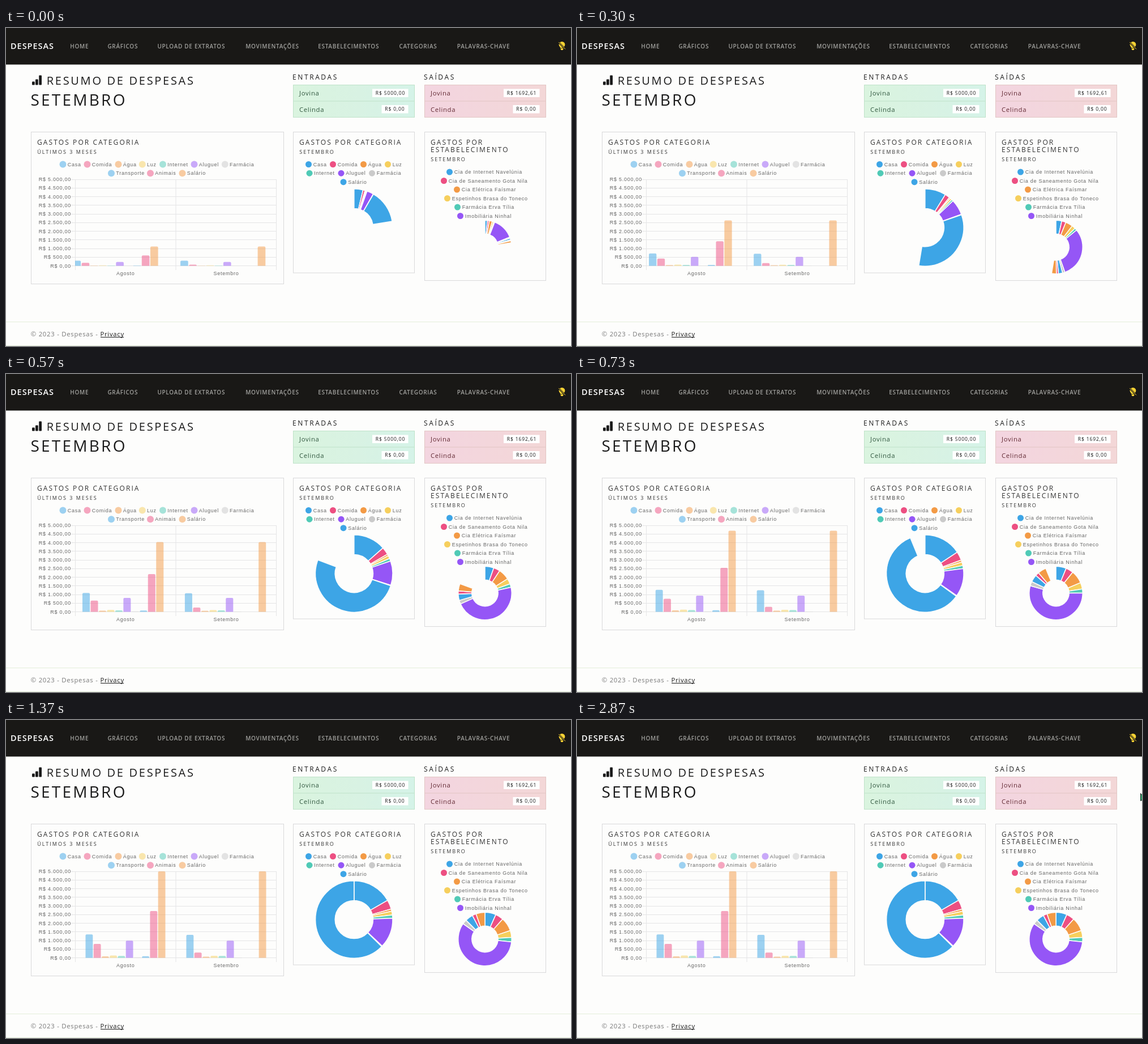
Animation, 998 px wide and 561 px high, one loop 3230 ms. Source, as an HTML page with a canvas:

```html
<!DOCTYPE html>
<html lang="pt-BR">
<head>
<meta charset="utf-8">
<title>Despesas</title>
<style>
  html, body { margin: 0; width: 100%; height: 100%; overflow: hidden; background: #fdfdfc; }
  svg, canvas { position: absolute; left: 0; top: 0; width: 998px; height: 561px; }
  text { font-family: "Open Sans", "Noto Sans", sans-serif; fill: #1a1a1a; white-space: pre; }
  .brand { font-size: 14.5px; font-weight: 600; letter-spacing: .95px; fill: #fff; }
  .nav { font-size: 10px; font-weight: 600; letter-spacing: .7px; fill: #a0a09d; }
  .title { font-size: 20px; letter-spacing: 2.7px; }
  .month { font-size: 28px; letter-spacing: 3.2px; }
  .head { font-size: 12px; letter-spacing: 2.6px; }
  .card { font-size: 12px; letter-spacing: 2.1px; fill: #333; }
  .sub { font-size: 9px; letter-spacing: 2px; fill: #333; }
  .person { font-size: 11.3px; letter-spacing: .7px; }
  .badge { font-size: 8.5px; letter-spacing: .9px; }
  .foot { font-size: 11.3px; letter-spacing: .75px; fill: #777; }
  .link { fill: #1a1a1a; }
  .chart { font-family: "Liberation Sans", Arial, sans-serif; font-size: 9px; letter-spacing: .75px; fill: #666; }
  .end { text-anchor: end; }
  .mid { text-anchor: middle; }
</style>
</head>
<body>
<svg id="page" viewBox="0 0 998 561">
  <defs>
    <linearGradient id="green"><stop offset="0" stop-color="#daf4df"/><stop offset=".55" stop-color="#d8f2e3"/><stop offset="1" stop-color="#d5f3e8"/></linearGradient>
    <linearGradient id="red"><stop offset="0" stop-color="#f3d5e0"/><stop offset="1" stop-color="#f3d7d7"/></linearGradient>
  </defs>
  <rect width="998" height="64.5" fill="#191816"/>
  <g fill="#fbd434">
    <path d="M982 24a5.4 5.4 0 0 1 5.4 5.4c0 2.300-2.200 3.600-2.600 5.600h-5.600c-.4-2-2.600-3.300-2.600-5.600A5.400 5.400 0 0 1 982 24z"/>
    <path d="M979.400 35.800h5.200l-.5 2-.9 1.200h-2.400l-.9-1.200z"/>
    <path d="M976 25l12 12.500" stroke="#191816" stroke-width="2.600"/>
    <path d="M976.300 25l11.700 12.300" stroke="#fbd434" stroke-width="1"/>
  </g>
  <g fill="#1a1a1a">
    <rect x="46" y="94.500" width="4.800" height="6" rx="1"/>
    <rect x="52" y="90.500" width="4.800" height="10" rx="1"/>
    <rect x="58.200" y="83.500" width="4.800" height="17" rx="1"/>
  </g>
  <path d="M0 518.500H998M0 560.500H998" stroke="#e4efda"/>
  <path d="M167 545.500H208" stroke="#1a1a1a"/>
</svg>
<canvas id="charts"></canvas>
<script>
const page = document.getElementById('page');
const canvas = document.getElementById('charts');
const ctx = canvas.getContext('2d');
const LOOP = 3230, TAU = Math.PI * 2;
const BG = '#fdfdfc';
const BLUE = '#3da5e6', PINK = '#ed4f82', ORANGE = '#f39a45', YELLOW = '#f6cf5d',
      TEAL = '#50cab6', PURPLE = '#9556f6', GRAY = '#cacaca';
const PALETTE = [BLUE, PINK, ORANGE, YELLOW, TEAL, PURPLE, GRAY];

function add(tag, attrs, content) {
  const el = document.createElementNS('http://www.w3.org/2000/svg', tag);
  for (const key in attrs) el.setAttribute(key, attrs[key]);
  if (content) el.textContent = content;
  page.appendChild(el);
  return el;
}
const text = (cls, x, y, str, fill) => {
  const el = add('text', { class: cls, x, y }, str);
  if (fill) el.style.fill = fill;
};
const box = (x, y, width, height, fill, stroke = 'none') => add('rect', { x, y, width, height, fill, stroke });
const path = (d, stroke) => add('path', { d, stroke, fill: 'none' });

// Page frame
text('brand', 8, 36.5, 'DESPESAS');
[[113.2, 'HOME'], [179.4, 'GRÁFICOS'], [267.4, 'UPLOAD DE EXTRATOS'], [423.2, 'MOVIMENTAÇÕES'],
 [551.2, 'ESTABELECIMENTOS'], [694.4, 'CATEGORIAS'], [796.8, 'PALAVRAS-CHAVE']]
  .forEach(([x, label]) => text('nav', x, 35.5, label));
text('title', 71.8, 99.5, 'RESUMO DE DESPESAS');
text('month', 43.5, 137, 'SETEMBRO');
text('foot', 43.8, 543.5, '© 2023 - Despesas -');
text('foot link', 166.4, 543.5, 'Privacy');

// Income and expense lists
function list(x, title, fill, stroke, ink, rows) {
  text('head', x - 1, 91.3, title);
  box(x + .5, 100.5, 214, 57, `url(#${fill})`, stroke);
  path(`M${x} 129H${x + 215}`, stroke);
  rows.forEach(([name, value, width], i) => {
    const y = 107.5 + i * 28.5;
    text('person', x + 11, y + 11.5, name, ink);
    box(x + 203.5 - width, y, width, 14.5, '#fff');
    text('badge', x + 209.500 - width - 0.2, y + 10.2, value);
  });
}
list(507, 'ENTRADAS', 'green', '#bfe2c9', '#31573f', [['Jovina', 'R$ 5000,00', 63.5], ['Celinda', 'R$ 0,00', 47]]);
list(739, 'SAÍDAS', 'red', '#e2c5c3', '#642c36', [['Jovina', 'R$ 1692,61', 63.5], ['Celinda', 'R$ 0,00', 47]]);

// Cards
function card(x, width, height, titles, sub) {
  box(x + .5, 183.5, width, height, 'none', '#d9d9db');
  titles.forEach((line, i) => text('card', x + 11, 205.5 + i * 13, line));
  text('sub', x + 11.300, 208.5 + titles.length * 13, sub);
}
card(44, 446, 268, ['GASTOS POR CATEGORIA'], 'ÚLTIMOS 3 MESES');
card(507, 214, 248.5, ['GASTOS POR CATEGORIA'], 'SETEMBRO');
card(739, 214, 262, ['GASTOS POR', 'ESTABELECIMENTO'], 'SETEMBRO');

function legend(items, r, opacity) {
  items.forEach(([cx, cy, label], i) => {
    add('circle', { cx, cy, r, fill: PALETTE[i % 7], opacity });
    text('chart', cx + 8.3, cy + 3, label);
  });
}
legend([[100.5, 240.5, 'Casa'], [143.5, 240.5, 'Comida'], [198.5, 240.5, 'Água'], [240.8, 240.5, 'Luz'],
        [277, 240.5, 'Internet'], [332.500, 240.5, 'Aluguel'], [386.8, 240.5, 'Farmácia'],
        [186, 256.3, 'Transporte'], [255, 256.3, 'Animais'], [311.5, 256.3, 'Salário']], 6, .5);
legend([[534.5, 240.5, 'Casa'], [577.5, 240.5, 'Comida'], [631.5, 240.5, 'Água'], [674.5, 240.5, 'Luz'],
        [536, 256.2, 'Internet'], [592, 256.2, 'Aluguel'], [646.5, 256.2, 'Farmácia'],
        [596, 271.7, 'Salário']], 5.5, 1);
legend([[783.5, 254, 'Cia de Internet Navelúnia'], [773.5, 269.5, 'Cia de Saneamento Gota Nila'],
        [796.5, 285, 'Cia Elétrica Faísmar'], [779.5, 300.5, 'Espetinhos Brasa do Toneco'],
        [797.5, 316, 'Farmácia Erva Tília'], [802.5, 331.5, 'Imobiliária Ninhal']], 5.5, 1);

// Bar chart axes
const area = { left: 122, right: 478, top: 267, base: 419.7 };
const MAX = 5000;
const yOf = value => area.base - value / MAX * (area.base - area.top);
for (let v = 0; v <= MAX; v += 500) {
  const amount = v ? (v >= 1000 ? `${Math.floor(v / 1000)}.${String(v % 1000).padStart(3, '0')}` : v) : 0;
  const y = Math.floor(yOf(v)) + .5;
  path(`M115 ${y}H${area.right}`, '#e5e5e6');
  text('chart end', 115, yOf(v) + 3, `R$ ${amount},00`);
}
[122.5, 300, 477.5].forEach(x => path(`M${x} 267V427`, '#e5e5e6'));
text('chart mid', 211.3, 435.5, 'Agosto');
text('chart mid', 389, 435.5, 'Setembro');

// Pointer entering at the right edge
const pointer = add('path', { d: 'M995.5 129.500L1001 136V140L995.5 142.5Z', fill: '#2fa36b', stroke: '#16241c' });

// Animated charts
const august = [1360, 810, 90, 140, 110, 1000, 35, 100, 2710, 5000];
const september = [1335, 310, 75, 125, 110, 1000, 25, 0, 0, 5000];
const byCategory = september.filter(v => v > 0);
const byShop = [24, 17.5, 30, 15, 9.5, 209, 10, 17, 8.5, 19.5];

// [time, progress, slope per ms]
const KEYS = [[0, .223, .001], [300, .525, .00102], [570, .806, .00095], [730, .937, .00065], [870, 1, 0]];
function progress(t) {
  const i = KEYS.findIndex(k => k[0] > t);
  if (i < 0) return 1;
  const [t0, p0, m0] = KEYS[i - 1], [t1, p1, m1] = KEYS[i];
  const d = t1 - t0, u = (t - t0) / d, v = 1 - u;
  return v * v * ((1 + 2 * u) * p0 + u * d * m0) + u * u * ((1 + 2 * v) * p1 - v * d * m1);
}

function bars(p) {
  ctx.save();
  ctx.beginPath();
  ctx.rect(area.left, area.top, area.right - area.left, area.base - area.top);
  ctx.clip();
  ctx.globalAlpha = .5;
  // The plot starts wider, before the axis labels take their room
  const left = area.left - 30 * (1 - p);
  const slot = (area.right - left) / 2, pitch = slot * .08;
  [august, september].forEach((values, g) => values.forEach((value, i) => {
    if (!value) return;
    const x = left + slot * (g + .1) + pitch * (i + .05);
    const y = yOf(value * p), h = area.base - y, r = Math.min(2, h);
    ctx.fillStyle = PALETTE[i % 7];
    ctx.beginPath();
    ctx.roundRect(x, y, pitch * .9, h, [r, r, 0, 0]);
    ctx.fill();
  }));
  ctx.restore();
}

function doughnut(cx, cy, outer, inner, values, p) {
  const total = values.reduce((a, b) => a + b, 0);
  let from = -TAU / 4;
  ctx.strokeStyle = BG;
  ctx.lineWidth = 1.5;
  ctx.lineJoin = 'bevel';
  values.forEach((value, i) => {
    const to = from + value / total * TAU * p;
    ctx.beginPath();
    ctx.arc(cx, cy, outer, from, to);
    ctx.arc(cx, cy, inner, to, from, true);
    ctx.closePath();
    ctx.fillStyle = PALETTE[i % 7];
    ctx.fill();
    ctx.stroke();
    from = to;
  });
}

const ratio = window.devicePixelRatio || 1;
canvas.width = 998 * ratio;
canvas.height = 561 * ratio;
ctx.scale(ratio, ratio);

function draw() {
  const t = performance.now() % LOOP;
  const p = progress(t);
  ctx.clearRect(0, 0, 998, 561);
  bars(p);
  doughnut(614.8, 352, 68.2, 33.6, byCategory, p);
  doughnut(846, 386.5, 47.2, 23.2, byShop, p);
  pointer.setAttribute('visibility', t >= 2870 ? 'visible' : 'hidden');
  requestAnimationFrame(draw);
}
draw();
</script>
</body>
</html>
```
